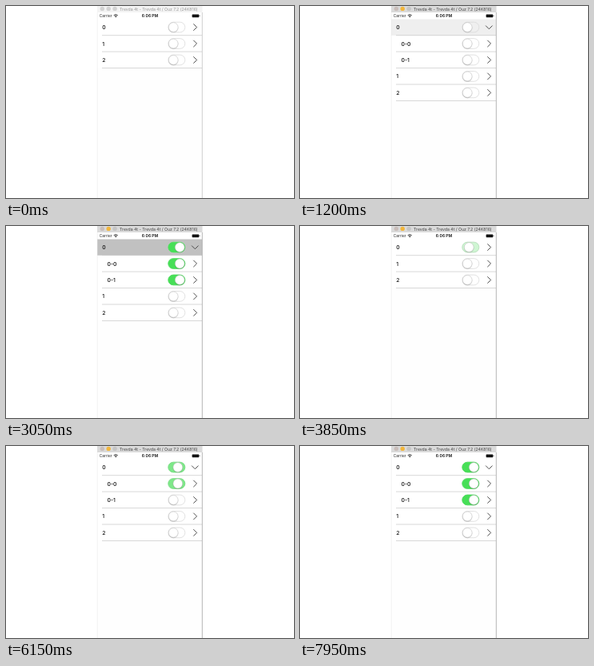
These frames come from a looping animation (360x240 px, 8 s). An HTML page:

```html
<!DOCTYPE html>
<html lang="en">
<head>
<meta charset="utf-8">
<title>Expandable list</title>
<style>
  html, body { margin: 0; width: 100%; height: 100%; overflow: hidden; background: #fff; }
  svg { display: block; width: 100vw; height: 100vh; font-family: Inter, "Liberation Sans", sans-serif; }
</style>
</head>
<body>
<svg id="stage" viewBox="0 0 360 240"></svg>
<script>
const LOOP = 8000, TOP = 16.3, ROW = 20.45, LEFT = 114, RIGHT = 245;
const EXPANDED = [[900, 1], [3080, 0], [4400, 1]];
const PRESSES = [[820, 900], [2960, 3080], [4320, 4400]];
const ROWS = [
  { label: "2", slot: 2, toggles: [] },
  { label: "1", slot: 1, toggles: [] },
  { label: "0-1", slot: 2, child: true, toggles: [[2050, 1], [3650, 0], [7050, 1]] },
  { label: "0-0", slot: 1, child: true, toggles: [[2050, 1], [3650, 0], [5960, 1]] },
  { label: "0", slot: 0, toggles: [[2050, 1], [3650, 0], [5960, 1]] }
];

const stage = document.getElementById("stage");

function add(parent, tag, attrs, text) {
  const el = document.createElementNS("http://www.w3.org/2000/svg", tag);
  set(el, attrs);
  if (text) el.textContent = text;
  parent.appendChild(el);
  return el;
}

function set(el, attrs) {
  for (const key in attrs) el.setAttribute(key, attrs[key]);
}

const clamp = u => Math.max(0, Math.min(1, u));
const ease = u => { u = clamp(u); return u * u * (3 - 2 * u); };

// Value of a two-state property that eases after each [time, state] change.
function track(changes, t, span) {
  let v = 0;
  for (const [at, to] of changes) v += (to - v) * ease((t - at) / span);
  return v;
}

function highlight(t) {
  let v = 0;
  for (const [down, up] of PRESSES) {
    if (t >= down) v = t < up ? 1 : 1 - ease((t - up) / 450);
  }
  return v;
}

function buildRow(row) {
  const g = add(stage, "g", {});
  add(g, "rect", { x: LEFT, y: 0, width: RIGHT - LEFT, height: ROW, fill: "#fff" });
  const glow = add(g, "rect", { x: LEFT, y: 0, width: RIGHT - LEFT, height: ROW, fill: "#c1c1c1", opacity: 0 });
  add(g, "path", { d: `M120 ${ROW - .1}H${RIGHT}`, stroke: "#c8c8c8", "stroke-width": .7 });
  add(g, "text", { x: row.child ? 126.5 : 120.3, y: 12.8, "font-size": 6.8, "font-weight": 500, fill: "#111" }, row.label);

  const pill = { x: 202.8, y: 3.9, width: 21, height: 12.7, rx: 6.35 };
  add(g, "rect", { ...pill, fill: "none", stroke: "#dadada", "stroke-width": .8 });
  const green = add(g, "rect", { ...pill, fill: "#47df57", stroke: "#47df57", "stroke-width": .8 });
  const knob = add(g, "g", {});
  add(knob, "circle", { cy: 11.1, r: 6.2, fill: "#000", opacity: .13 });
  add(knob, "circle", { cy: 10.25, r: 5.9, fill: "#fff", stroke: "#b8b8b8", "stroke-width": .5 });

  const arrow = add(g, "path", { d: "M-2 -4.2L2.2 0L-2 4.2", fill: "none", stroke: "#444", "stroke-width": .95 });
  Object.assign(row, { g, glow, green, knob, arrow });
}

// Phone screen
add(stage, "rect", { x: LEFT, y: 0, width: RIGHT - LEFT, height: 240, fill: "#fefefe" });
ROWS.forEach(buildRow);
add(stage, "rect", { x: LEFT, y: 8, width: RIGHT - LEFT, height: TOP - 8, fill: "#fff" });
add(stage, "path", { d: "M114.2 8V240", stroke: "#e4e4e4", "stroke-width": .5 });
const edge = add(stage, "path", { d: "M245.3 8V240", "stroke-width": .8 });

// Title bar
const bar = add(stage, "rect", { x: LEFT, y: 0, width: RIGHT - LEFT + .5, height: 8 });
const lights = [120.3, 128.2, 136.1].map(cx => add(stage, "circle", { cx, cy: 3.4, r: 2.7 }));
const title = add(stage, "text", { x: 142, y: 5.5, "font-size": 5.15 }, "Trevda 4t - Trevda 4t / Ouz 7.2 (24K816)");

// Status bar
add(stage, "text", { x: 116.8, y: 14, "font-size": 4.8, fill: "#222" }, "Carrier");
add(stage, "text", { x: 180, y: 14, "font-size": 5, "font-weight": 600, "text-anchor": "middle", fill: "#111" }, "6:06 PM");
add(stage, "path", { d: "M134.7 11.6Q137.2 9.5 139.7 11.6M135.7 12.7Q137.2 11.5 138.7 12.7", fill: "none", stroke: "#111", "stroke-width": .8 });
add(stage, "circle", { cx: 137.2, cy: 13.7, r: .6, fill: "#111" });
add(stage, "rect", { x: 232.6, y: 10.4, width: 8.6, height: 3.8, rx: .6, fill: "#111" });
add(stage, "rect", { x: 241.6, y: 11.6, width: .7, height: 1.4, fill: "#111" });

function render(t) {
  const open = track(EXPANDED, t, 290);
  const active = t >= 450;

  for (const row of ROWS) {
    let slot = row.slot;
    if (row.child) slot *= open;
    else if (slot) slot += 2 * open;
    const on = track(row.toggles, t, 300);
    const root = row.label === "0";
    set(row.g, {
      transform: `translate(0 ${TOP + slot * ROW})`,
      opacity: row.child ? open : 1,
      visibility: row.child && open === 0 ? "hidden" : "visible"
    });
    set(row.glow, { opacity: root ? highlight(t) : 0 });
    set(row.green, { opacity: on });
    set(row.knob, { transform: `translate(${209.2 + 8 * on} 0)` });
    set(row.arrow, { transform: `translate(236.3 10.25) rotate(${root ? 90 * open : 0})` });
  }

  set(bar, { fill: active ? "#dadada" : "#f3f3f3" });
  set(title, { fill: active ? "#444" : "#999" });
  set(edge, { stroke: active ? "#a2a2a2" : "#c4c4c4" });
  const colors = active ? ["#c9bdb9", "#f2b63c", "#c4c4c4"] : ["#d2d2d2", "#d2d2d2", "#d2d2d2"];
  lights.forEach((light, i) => set(light, { fill: colors[i] }));
}

const start = performance.now();
function tick() {
  render((performance.now() - start) % LOOP);
  requestAnimationFrame(tick);
}
render(0);
requestAnimationFrame(tick);
</script>
</body>
</html>
```
